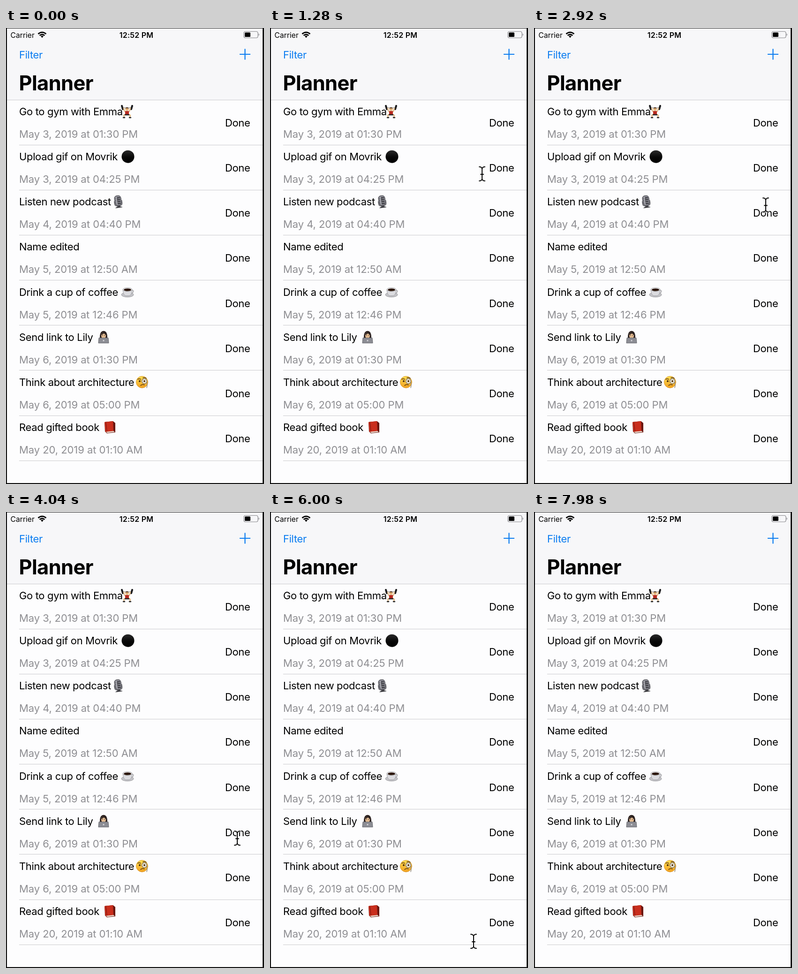
Recreate the animation shown at these times as an HTML page. Size 550x972 px, loop 8000 ms.

```html
<!DOCTYPE html>
<html lang="en">
<head>
<meta charset="utf-8">
<title>Planner</title>
<style>
  html, body { margin: 0; width: 100%; height: 100%; overflow: hidden; background: #fdfdfe; }
  svg { display: block; width: 100vw; height: 100vh; }
  text {
    font: 22px Inter, Roboto, sans-serif;
    font-optical-sizing: none;
    letter-spacing: -.016em;
    fill: #000;
  }
  .status { font-size: 15.7px; letter-spacing: 0; }
  .clock { font-size: 16px; font-weight: 600; letter-spacing: .014em; text-anchor: middle; }
  .heading { font-size: 43.5px; font-weight: 700; letter-spacing: -.016em; }
  .link { fill: #0a7cf0; }
  .date { fill: #8e8e92; letter-spacing: -.003em; }
  .done { text-anchor: end; }
  .rule { stroke: #cbcbce; shape-rendering: crispEdges; }
</style>
</head>
<body>
<svg viewBox="0 0 550 972" preserveAspectRatio="none">
  <defs>
    <linearGradient id="moonFill" x2="0" y2="1">
      <stop offset="0" stop-color="#2a2a2a"/><stop offset=".55" stop-color="#080808"/><stop offset="1" stop-color="#000"/>
    </linearGradient>
    <linearGradient id="faceFill" x2="0" y2="1">
      <stop offset="0" stop-color="#ffe052"/><stop offset="1" stop-color="#f0a020"/>
    </linearGradient>

    <g id="lifter" stroke-linecap="round" stroke-linejoin="round" fill="none">
      <path d="M-10-8H10" stroke="#777" stroke-width="1.2"/>
      <path d="M-11-12L-9-5M11-12L9-5" stroke="#1c1c1e" stroke-width="4"/>
      <path d="M-7-7L-5 0H5L7-7" stroke="#e3bd8c" stroke-width="2.6"/>
      <path d="M-3 6L-7 8-6 12M3 6L7 8 6 12" stroke="#e3bd8c" stroke-width="2.6"/>
      <path d="M-4-1H4L4 7H-4Z" fill="#b92a20"/>
      <circle cy="-5" r="3.6" fill="#e3b57c"/>
      <path d="M-4-6Q0-12 4-6Q0-8-4-6" fill="#40220f"/>
      <path d="M-4 7H4M-8 13H-5M5 13H8" stroke="#252527" stroke-width="2.4"/>
    </g>

    <circle id="moon" r="13.5" fill="url(#moonFill)"/>

    <g id="mic" transform="rotate(-8)">
      <path d="M-3 6H3V11H-3Z" fill="#55555a"/>
      <path d="M-8 13Q0 7 8 13Z" fill="#333338"/>
      <rect x="-7" y="-13" width="14" height="21" rx="6" fill="#85858d" stroke="#424248"/>
      <path d="M-5-8H5M-5-4H5M-5 0H5M-5 4H5" stroke="#2b2b30" stroke-width="1.8"/>
      <path d="M-3-11V6" stroke="#d4d4dc" stroke-width="1.5"/>
      <path d="M-8-2V4Q-8 9 0 9T8 4V-2" fill="none" stroke="#56565c" stroke-width="1.5"/>
    </g>

    <g id="coffee">
      <ellipse cy="6" rx="13" ry="5" fill="#c4c4c8" stroke="#9c9ca0"/>
      <path d="M8-3Q14-4 12 0T6 4" fill="none" stroke="#b0b0b4" stroke-width="2"/>
      <path d="M-10-5Q-9 7-4 8H4Q9 7 10-5Z" fill="#dcdce0" stroke="#a6a6aa"/>
      <ellipse cy="-5" rx="10" ry="4" fill="#efeff2" stroke="#a6a6aa"/>
      <ellipse cy="-4.5" rx="8" ry="2.8" fill="#291407"/>
    </g>

    <g id="coder">
      <path d="M-8 5Q-9-13 0-13T8 5Z" fill="#2c2220"/>
      <path d="M-11 12Q-11 3 0 3T11 12Z" fill="#474b55"/>
      <ellipse cy="-3" rx="5" ry="6.5" fill="#e6bd92"/>
      <path d="M-5-4Q-3-10 1-10Q5-9 5-4Q2-6 1-8Q-2-5-5-4" fill="#2c2220"/>
      <path d="M-3-3H-1.5M1.5-3H3" stroke="#2c2220" stroke-width="1.4"/>
      <path d="M-10 2H10L11 13H-11Z" fill="#8c8d94" stroke="#696a70"/>
      <circle cy="7.5" r="1.5" fill="#dadade"/>
    </g>

    <g id="monocle" fill="none" stroke-linecap="round">
      <circle r="12.5" fill="url(#faceFill)" stroke="#d48c1c" stroke-width=".8"/>
      <circle cx="5" cy="-2" r="5.2" fill="#f4eedb" stroke="#8b8070" stroke-width="1.6"/>
      <path d="M10 0Q12 5 10 12" stroke="#8b8070" stroke-width="1.3"/>
      <circle cx="-5" cy="-2" r="2" fill="#4b2c0c"/>
      <circle cx="5" cy="-2" r="2" fill="#4b2c0c"/>
      <path d="M-9-6Q-6-8-3-6M2-9Q6-11 9-8M-3 7Q1 4 5 6" stroke="#5e390f" stroke-width="1.6"/>
    </g>

    <g id="book">
      <path d="M-11-11L7-13 12-9 12 11-6 13-10 9Z" fill="#6b160e"/>
      <path d="M-9 9L8 8 11 10-5 12Z" fill="#efe9dc"/>
      <path d="M-11-11L7-13 8 8-9 10Z" fill="#c92e1d"/>
      <path d="M-8-11L-6 9" stroke="#8d1b10" stroke-width="1.5"/>
    </g>

    <path id="beam" d="M-6-15Q-1-15 0-11Q1-15 6-15M0-11V11M-6 15Q-1 15 0 11Q1 15 6 15M-3 1H3"/>
  </defs>

  <rect width="550" height="972" fill="#fdfdfe"/>
  <rect width="550" height="154" fill="#f7f7f9"/>
  <path class="rule" d="M2 153.5H547"/>

  <text class="status" x="9.5" y="20.5">Carrier</text>
  <g fill="none" stroke="#000" stroke-width="2.8">
    <path d="M68.5 12.6Q77 5.6 85.5 12.6M71.7 16Q77 11.6 82.3 16"/>
    <path d="M74 17.6Q77 15.4 80 17.6L77 21Z" fill="#000" stroke="none"/>
  </g>
  <text class="status clock" x="278" y="20.5">12:52 PM</text>
  <rect x="507" y="7.5" width="30" height="13.5" rx="3.5" fill="none" stroke="#88888c" stroke-width="1.2"/>
  <rect x="509" y="9.5" width="12" height="9.5" rx="1.5"/>
  <path d="M538.5 11.5Q541.5 14.2 538.5 17Z" fill="#88888c"/>

  <text class="link" x="28" y="64.5">Filter</text>
  <path d="M498 56H521M509.5 44.5V67.5" stroke="#0a7cf0" stroke-width="2.2"/>
  <text class="heading" x="27.5" y="133">Planner</text>

  <g id="list"></g>

  <g id="cursor" fill="none" stroke-linecap="round">
    <use href="#beam" stroke="#fff" stroke-width="4"/>
    <use href="#beam" stroke="#000" stroke-width="2"/>
  </g>

  <path d="M0 .5H550" stroke="#222"/>
  <path d="M1 0V972M0 971H550" stroke="#080808" stroke-width="2"/>
  <path d="M548.5 0V972" stroke="#141414" stroke-width="3"/>
</svg>
<script>
const SVG = "http://www.w3.org/2000/svg";
const list = document.getElementById("list");
const ROW_HEIGHT = 96.13;

// title, date, icon, icon centre x
const tasks = [
  ["Go to gym with Emma", "May 3, 2019 at 01:30 PM", "lifter", 258],
  ["Upload gif on Movrik", "May 3, 2019 at 04:25 PM", "moon", 260],
  ["Listen new podcast", "May 4, 2019 at 04:40 PM", "mic", 239],
  ["Name edited", "May 5, 2019 at 12:50 AM"],
  ["Drink a cup of coffee", "May 5, 2019 at 12:46 PM", "coffee", 259],
  ["Send link to Lily", "May 6, 2019 at 01:30 PM", "coder", 208],
  ["Think about architecture", "May 6, 2019 at 05:00 PM", "monocle", 290],
  ["Read gifted book", "May 20, 2019 at 01:10 AM", "book", 221],
];

function add(tag, attributes, content = "") {
  const node = document.createElementNS(SVG, tag);
  for (const [key, value] of Object.entries(attributes)) node.setAttribute(key, value);
  node.textContent = content;
  list.append(node);
}

tasks.forEach(([title, date, icon, iconX], i) => {
  const y = i * ROW_HEIGHT;
  add("text", { x: 28, y: 186 + y }, title);
  add("text", { x: 28, y: 234 + y, class: "date" }, date);
  add("text", { x: 520.5, y: 210 + y, class: "done" }, "Done");
  add("path", { d: `M28 ${Math.floor(249.3 + y) + .5}H547`, class: "rule" });
  if (icon) add("use", { href: "#" + icon, transform: `translate(${iconX} ${178 + y})` });
});

// time in ms, x, y
const LOOP = 8000;
const path = [
  [0, 575, 345], [440, 575, 345], [800, 508, 328], [1280, 452, 311],
  [1640, 478, 245], [2000, 494, 210], [2400, 494, 286], [2920, 494, 377],
  [3400, 494, 510], [4040, 493, 695], [4400, 489, 798], [4780, 479, 884],
  [5300, 460, 908], [6000, 434, 915], [6240, 428, 935], [6560, 420, 995], [LOOP, 420, 995],
];
document.getElementById("cursor").animate(
  path.map(([time, x, y]) => ({ offset: time / LOOP, transform: `translate(${x}px, ${y}px)` })),
  { duration: LOOP, iterations: Infinity }
);
</script>
</body>
</html>
```
